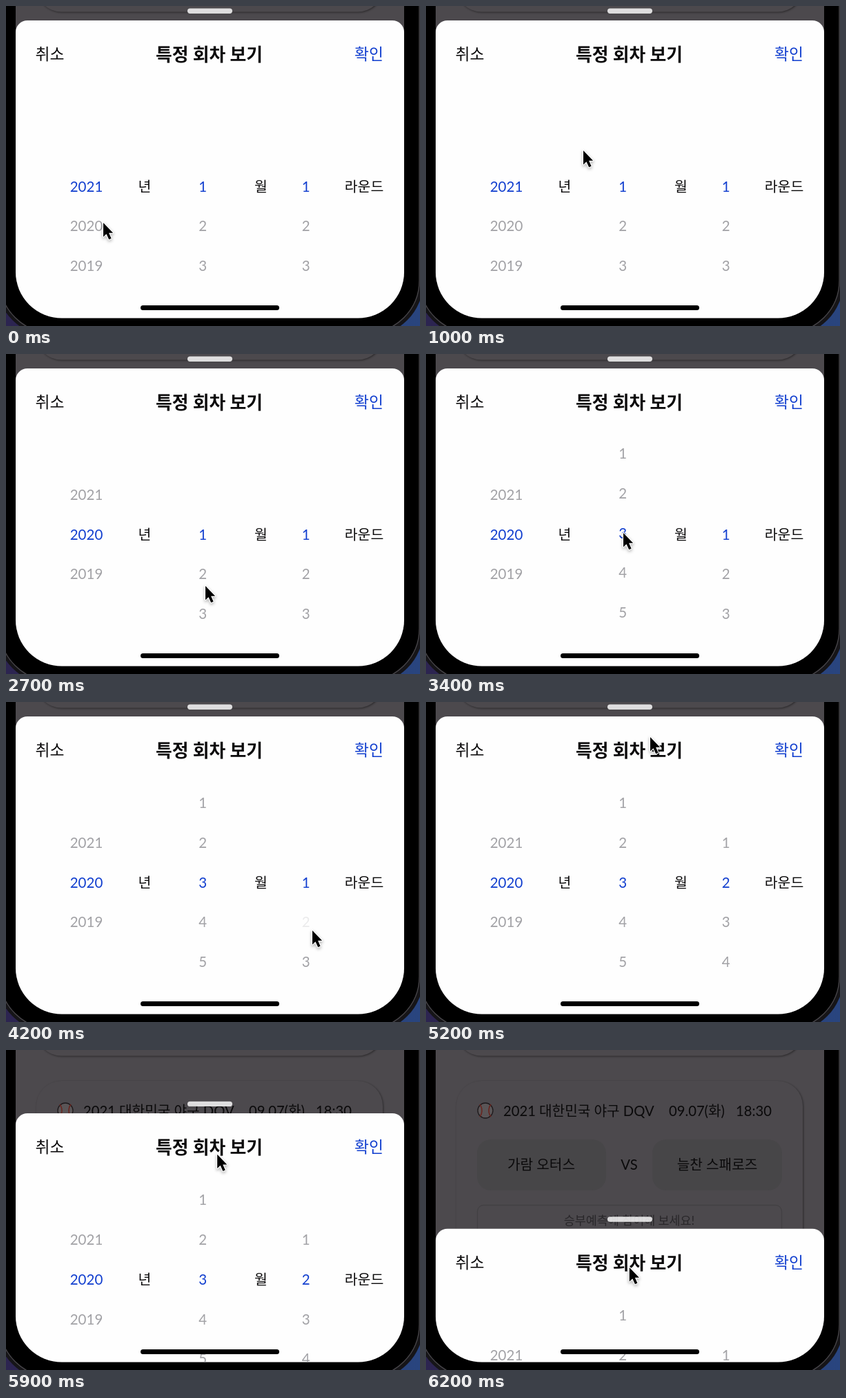
These frames come from a looping animation (600 by 465 pixels, 6.3 s). An HTML page with a canvas:

```html
<!DOCTYPE html>
<html lang="ko">
<head>
<meta charset="utf-8">
<title>특정 회차 보기</title>
<style>
  html, body { margin: 0; width: 100%; height: 100%; overflow: hidden; background: #000; }
  canvas { display: block; width: 600px; height: 465px; }
</style>
</head>
<body>
<canvas id="stage" width="600" height="465"></canvas>
<script>
const ctx = document.getElementById('stage').getContext('2d');
const LOOP = 6300, STEP = 100, ROW = 57.75, CENTER = 262;
const FONT = 'Lato, "Noto Sans CJK KR", "Noto Sans CJK", sans-serif';
const BLUE = '#123fcf', GREY = '#a2a2a6', INK = '#0b0a0b';

const numbers = Array.from({ length: 12 }, (_, i) => i + 1);
const wheels = [
  { x: 116.5, items: [2021, 2020, 2019], label: '년', labelX: 201,
    swipe: { start: 1700, duration: 400, rows: 1, overshoot: 3.8 } },
  { x: 285.3, items: numbers, label: '월', labelX: 369.5,
    swipe: { start: 2900, duration: 600, rows: 2, overshoot: 1 } },
  { x: 434.7, items: numbers, label: '라운드', labelX: 519, pressed: 2,
    swipe: { start: 4350, duration: 500, rows: 1, overshoot: 1.7 } }
];

// Pointer stops: time, x, y. After the last one it drags the sheet.
const stops = [
  [0, 141, 315], [1000, 228, 210], [1500, 122, 336], [1700, 137, 323],
  [1900, 136, 246], [2700, 289, 337], [2900, 287, 372], [3400, 286, 260],
  [4200, 444, 332], [4700, 444, 261], [5200, 325, 51], [5700, 311, 82]
];

const progress = (t, start, duration) => Math.min(1, Math.max(0, (t - start) / duration));
const smooth = u => u * u * (3 - 2 * u);
const backOut = (u, c) => 1 + (c + 1) * (u - 1) ** 3 + c * (u - 1) ** 2;

function scrollAt({ start, duration, rows, overshoot }, t) {
  return rows * ROW * backOut(progress(t, start, duration), overshoot);
}

function dropAt(t) {
  const s = Math.max(0, t - 5700) / 100;
  return 27.4 * s + 4.07 * s * s;
}

function pointerAt(t) {
  const next = stops.findIndex(stop => stop[0] > t);
  if (next < 0) {
    const [, x, y] = stops[stops.length - 1], drop = dropAt(t);
    return [x - drop * .068, y + drop * .98];
  }
  const [t0, x0, y0] = stops[next - 1], [t1, x1, y1] = stops[next];
  const k = smooth(progress(t, t0, t1 - t0));
  return [x0 + (x1 - x0) * k, y0 + (y1 - y0) * k];
}

function box(x, y, w, h, r, fill, stroke, width = 1) {
  ctx.beginPath();
  ctx.roundRect(x, y, w, h, r);
  if (fill) { ctx.fillStyle = fill; ctx.fill(); }
  if (stroke) { ctx.strokeStyle = stroke; ctx.lineWidth = width; ctx.stroke(); }
}

function text(value, x, y, size, color, align = 'center', weight = 400) {
  ctx.font = `${weight} ${size}px ${FONT}`;
  ctx.textAlign = align;
  ctx.fillStyle = color;
  ctx.fillText(value, x, y);
}

function shadowed(color, blur, dx, dy, draw) {
  ctx.save();
  ctx.shadowColor = color;
  ctx.shadowBlur = blur;
  ctx.shadowOffsetX = dx;
  ctx.shadowOffsetY = dy;
  draw();
  ctx.restore();
}

function drawPhone() {
  const desk = ctx.createLinearGradient(0, 0, 600, 0);
  desk.addColorStop(0, '#2c2450');
  desk.addColorStop(1, '#29457f');
  ctx.fillStyle = desk;
  ctx.fillRect(0, 0, 600, 465);
  box(-14, -200, 619, 680, 80, '#161518');
  box(-9, -200, 608, 675, 76, '#000', '#49474b', 1.3);
}

function drawBall(x, y) {
  ctx.beginPath();
  ctx.arc(x, y, 11, 0, 7);
  ctx.fillStyle = '#5a5557';
  ctx.fill();
  ctx.strokeStyle = '#1d191b';
  ctx.lineWidth = 1.3;
  ctx.stroke();
  ctx.strokeStyle = '#67251f';
  ctx.lineWidth = 1.6;
  for (const side of [0, Math.PI]) {
    ctx.beginPath();
    ctx.ellipse(x - 11 * Math.cos(side), y, 6, 10, 0, side - 1.1, side + 1.1);
    ctx.stroke();
  }
}

function drawBehind() {
  const base = '#4c494d';
  ctx.fillStyle = base;
  ctx.fillRect(14, 0, 563, 465);
  const card = (y, h) => shadowed('rgba(0,0,0,.45)', 3, 1, 1,
    () => box(44, y, 502, h, 36, base));
  card(-200, 208.5);
  card(45, 400);
  drawBall(86, 88);
  text('2021 대한민국 야구 DQV', 112, 96.3, 20.2, INK, 'left');
  text('09.07(화)', 352, 96.3, 20.2, INK, 'left');
  text('18:30', 501, 96.3, 20.2, INK, 'right');
  box(74, 130, 187, 74, 20, '#474648');
  box(328, 130, 188, 74, 20, '#474648');
  text('가람 오터스', 167, 174, 20.2, INK);
  text('VS', 294.5, 174, 20.2, INK);
  text('늘찬 스패로즈', 422, 174, 20.2, INK);
  box(74.5, 225.5, 441, 80, 9, null, '#424043', 1.3);
  text('승부예측에 참여해 보세요!', 294.5, 254, 17.4, '#29272a');
}

function drawWheel(wheel, t) {
  const scroll = scrollAt(wheel.swipe, t);
  const active = Math.round(scroll / ROW);
  const press = Math.sin(Math.PI * progress(t, 4000, 400));
  ctx.save();
  ctx.beginPath();
  ctx.rect(wheel.x - 45, CENTER - 2.5 * ROW, 90, 5 * ROW);
  ctx.clip();
  wheel.items.forEach((item, i) => {
    ctx.globalAlpha = item === wheel.pressed ? 1 - .8 * press : 1;
    text(item, wheel.x, CENTER + i * ROW - scroll + 7.7, 20.5, i === active ? BLUE : GREY);
  });
  ctx.restore();
  text(wheel.label, wheel.labelX, CENTER + 7.5, 20.5, INK);
}

function drawSheet(t) {
  ctx.save();
  ctx.translate(0, dropAt(t));
  box(263, 3.6, 65, 7.4, 3.7, 'rgba(255,255,255,.82)');
  box(14, 21, 563, 460, [17, 17, 0, 0], '#fefefe');
  text('취소', 63.5, 78.4, 22.8, INK);
  text('특정 회차 보기', 294.5, 80.4, 25.8, INK, 'center', 700);
  text('확인', 526, 78.4, 22.8, BLUE);
  wheels.forEach(wheel => drawWheel(wheel, t));
  ctx.restore();
}

const arrow = new Path2D('M0 0V21.5L4.9 17L8.9 25.6L12.6 24L8.8 15.6H15.4Z');
function drawPointer([x, y]) {
  ctx.save();
  ctx.translate(x, y);
  ctx.scale(.92, .95);
  ctx.strokeStyle = '#fff';
  ctx.lineWidth = 2.4;
  ctx.lineJoin = 'round';
  shadowed('rgba(0,0,0,.35)', 4, 0, 2, () => ctx.stroke(arrow));
  ctx.fillStyle = '#000';
  ctx.fill(arrow);
  ctx.restore();
}

function draw(t) {
  drawPhone();
  ctx.save();
  ctx.beginPath();
  ctx.roundRect(14, -200, 563, 653.5, 67);
  ctx.clip();
  drawBehind();
  drawSheet(t);
  ctx.restore();
  box(195, 435, 201, 7, 3.5, '#000');
  drawPointer(pointerAt(t));
}

const start = performance.now();
function tick() {
  const t = (performance.now() - start) % LOOP;
  draw(Math.floor(t / STEP) * STEP);
  requestAnimationFrame(tick);
}
tick();
</script>
</body>
</html>
```
